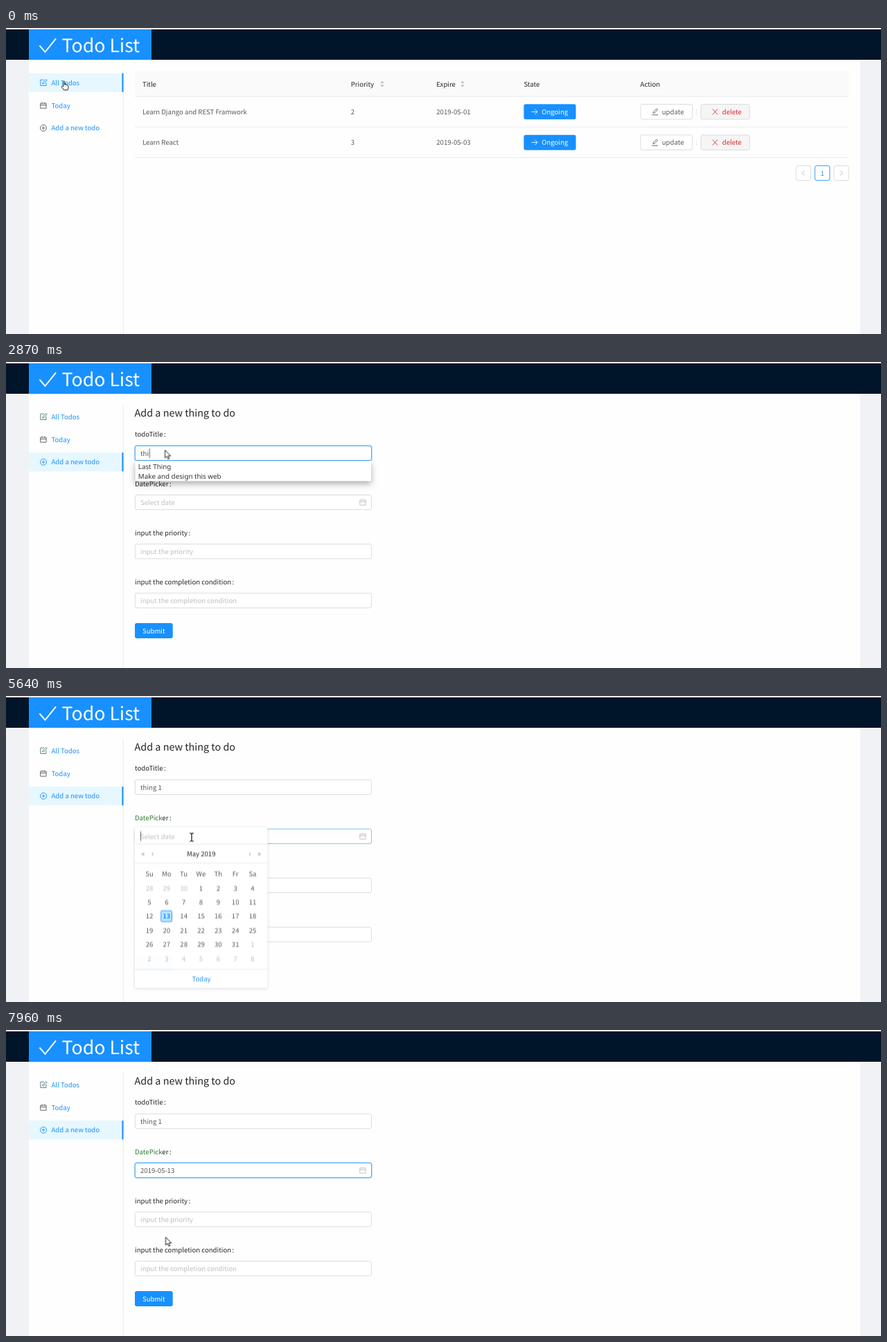
An HTML page for the animation above (8000 ms loop, 1263 by 443 pixels).

```html
<!DOCTYPE html>
<html lang="en">
<head>
<meta charset="utf-8">
<title>Todo List</title>
<style>
html, body { margin: 0; width: 100%; height: 100%; overflow: hidden; background: #f0f2f5; }
svg { display: block; width: 1263px; height: 443px; }
text { font: 9.6px "Noto Sans CJK SC", "Noto Sans CJK JP", "Noto Sans CJK", sans-serif; fill: #595959; text-rendering: geometricPrecision; white-space: pre; }
.link { fill: #1890ff; }
.dark { fill: #262626; }
.strong { font-weight: 500; fill: #262626; }
.ph { fill: #bfbfbf; }
.white { fill: #fff; }
.red { fill: #e0282a; }
.mid { text-anchor: middle; }
.brand { font-size: 26.7px; font-weight: 300; fill: #fff; }
.h2 { font-size: 14.36px; font-weight: 500; fill: #262626; }
.arrow { font-size: 11px; fill: #8c8c8c; }
.menu text { font-family: "Noto Sans", "Open Sans", sans-serif; font-size: 9.8px; fill: #333; }
.icon { fill: none; stroke: currentColor; stroke-width: .9; color: #595959; }
.box { fill: #fff; stroke: #d9d9d9; stroke-width: .9; }
.blue { fill: #1890ff; }
.rule { stroke: #e8e8e8; stroke-width: .9; }
.caret { stroke: #444; stroke-width: .8; }
.ring rect { fill: none; stroke: #40a9ff; }
.ring .glow { stroke: #1890ff; stroke-opacity: .2; stroke-width: 1.5; }

/* 1% of the loop is 80 ms */
.hold { animation: 8s step-end infinite; }
.flow { animation: 8s linear infinite; }

.list { animation-name: list; }
.form { animation-name: form; }
@keyframes list { 0% { visibility: visible } 13.5%, 100% { visibility: hidden } }
@keyframes form { 0% { visibility: hidden } 13.5%, 100% { visibility: visible } }

.bg-all { animation-name: bgAll; }
.bg-add { animation-name: bgAdd; }
.bar-all { animation-name: barAll; }
.bar-add { animation-name: barAdd; }
.ic-all { animation-name: icAll; }
.ic-today { animation-name: icToday; }
.ic-add { animation-name: icAdd; }
@keyframes bgAll { 0%, 13.7% { opacity: 1 } 17.3%, 100% { opacity: 0 } }
@keyframes bgAdd { 0%, 12.4% { opacity: 0 } 13.5% { opacity: .5 } 15.6%, 100% { opacity: 1 } }
@keyframes barAll { 0%, 13.7% { opacity: 1 } 15.6%, 100% { opacity: 0 } }
@keyframes barAdd { 0%, 13.7% { opacity: 0 } 15.6%, 100% { opacity: 1 } }
@keyframes icAll { 0%, 13.7% { color: #1890ff } 17.3%, 100% { color: #4d7479 } }
@keyframes icToday { 0%, 3% { color: #595959 } 5%, 6.5% { color: #1890ff } 9%, 100% { color: #595959 } }
@keyframes icAdd { 0%, 7.5% { color: #595959 } 10.6%, 100% { color: #1890ff } }

.focus-title { animation-name: focusTitle; }
.hover-date { animation-name: hoverDate; }
.focus-date { animation-name: focusDate; }
@keyframes focusTitle { 0%, 22.4% { opacity: 0 } 27.4%, 67% { opacity: 1 } 70%, 100% { opacity: 0 } }
@keyframes hoverDate { 0%, 62% { opacity: 0 } 66%, 70.5% { opacity: .5 } 74%, 100% { opacity: 0 } }
@keyframes focusDate { 0%, 93.7% { opacity: 0 } 97.5%, 100% { opacity: 1 } }

.type { animation-name: type; }
.ph-title { animation-name: phTitle; }
.caret-title { animation-name: caretTitle; }
@keyframes type {
  0% { transform: none }
  31.875% { transform: translateX(3.6px) }
  33.875% { transform: translateX(9.5px) }
  35.875% { transform: translateX(12.1px) }
  39.75% { transform: translateX(18px) }
  42.625% { transform: translateX(23.4px) }
  45.5% { transform: translateX(25.6px) }
  48.375%, 100% { transform: translateX(30.9px) }
}
@keyframes phTitle { 0% { visibility: inherit } 31.875%, 100% { visibility: hidden } }
@keyframes caretTitle { 0% { opacity: 0 } 23.4% { opacity: 1 } 67.75%, 100% { opacity: 0 } }

.menu { animation-name: menu; filter: drop-shadow(0 4px 5px rgba(0,0,0,.32)); }
.menu-box { animation-name: menuBox; }
.all-hits { animation-name: allHits; }
.hits { animation-name: hits; }
.hit-two { animation-name: hitTwo; }
@keyframes menu { 0%, 31.86% { opacity: 0 } 31.875%, 48.375% { opacity: 1 } 50.25%, 100% { opacity: 0 } }
@keyframes menuBox { 0% { height: 56.5px } 33.875% { height: 29px } 39.75%, 100% { height: 15.5px } }
@keyframes allHits { 0% { opacity: 1 } 33.875%, 100% { opacity: 0 } }
@keyframes hits { 0% { opacity: 0 } 33.875%, 100% { opacity: 1 } }
@keyframes hitTwo { 0% { opacity: 1 } 39.75%, 100% { opacity: 0 } }

.tint { animation-name: tint; }
@keyframes tint { 0% { fill: #262626 } 48.375%, 100% { fill: #2e7d32 } }

.picker { transform-origin: 186px 190px; filter: drop-shadow(0 1.4px 2.7px rgba(0,0,0,.15)); animation-name: picker; }
.caret-date { animation-name: caretDate; }
.empty { animation-name: empty; }
.filled { animation-name: filled; }
@keyframes picker {
  0% { opacity: 0; transform: scaleY(.8) }
  69% { opacity: 0; transform: scaleY(.8); animation-timing-function: cubic-bezier(.23,1,.32,1) }
  71.5% { opacity: 1; transform: none }
  93.75% { opacity: 1; transform: none; animation-timing-function: cubic-bezier(.755,.05,.855,.06) }
  96.25%, 100% { opacity: 0; transform: scaleY(.8) }
}
@keyframes caretDate { 0% { opacity: 1 } 81% { opacity: 0 } 88.5% { opacity: 1 } 93.75%, 100% { opacity: 0 } }
@keyframes empty { 0% { opacity: 1 } 93.75%, 100% { opacity: 0 } }
@keyframes filled { 0% { opacity: 0 } 93.75%, 100% { opacity: 1 } }

.pointer { animation-name: pointer; }
.hand { animation-name: hand; }
.tip { animation-name: tip; }
.beam { animation-name: beam; }
@keyframes pointer {
  0%, .5% { transform: translate(84px, 78px); animation-timing-function: ease-in-out }
  10.6%, 15% { transform: translate(85px, 145px) }
  22.4% { transform: translate(218px, 132px); animation-timing-function: ease-out }
  27.4%, 58.4% { transform: translate(229.5px, 127.5px) }
  62.75% { transform: translate(253.5px, 208px) }
  63.75% { transform: translate(262px, 213px) }
  64.75%, 71.5% { transform: translate(268px, 204.5px) }
  79.5% { transform: translate(286px, 320px) }
  86% { transform: translate(252.5px, 331px) }
  89.9%, 95.75% { transform: translate(232px, 318px); animation-timing-function: ease-out }
  99.5%, 100% { transform: translate(230.5px, 300px) }
}
@keyframes hand { 0% { opacity: 1 } 19.9% { opacity: 0 } 75.7% { opacity: 1 } 95.75%, 100% { opacity: 0 } }
@keyframes tip {
  0% { opacity: 0 } 19.9% { opacity: 1 } 20.8% { opacity: 0 }
  31.875% { opacity: 1 } 48.375% { opacity: 0 } 59.5% { opacity: 1 } 62% { opacity: 0 }
  72.2% { opacity: 1 } 75.7% { opacity: 0 } 95.75%, 100% { opacity: 1 }
}
@keyframes beam {
  0% { opacity: 0 } 20.8% { opacity: 1 } 31.875% { opacity: 0 } 48.375% { opacity: 1 }
  59.5% { opacity: 0 } 62% { opacity: 1 } 72.2%, 100% { opacity: 0 }
}
</style>
</head>
<body>
<svg viewBox="0 0 1263 443">
  <defs>
    <g id="calendar"><path d="M.5 2h8.4v7.2H.5zM.5 4.5h8.4M2.9.6v2.2M6.5.6v2.2"/></g>
    <g id="sorter" fill="#bfbfbf"><path d="M-2.8-1.2L0-4.6 2.8-1.2zM-2.8 1.2L0 4.6 2.8 1.2z"/></g>
    <g id="actions">
      <rect class="blue" x="747.4" y="-11" width="75.2" height="22" rx="2.7"/>
      <path d="M758.5 0h8.6m-3.7-3.8L767.1 0l-3.7 3.8" fill="none" stroke="#fff" stroke-width=".9"/>
      <text class="white" x="773.3" y="3.5">Ongoing</text>
      <rect class="box" x="915.9" y="-10.8" width="74.8" height="21.6" rx="2.7"/>
      <path class="icon" d="M932.3 4.5h9M934 2l.4-1.9 4.7-4.6 1.6 1.6-4.7 4.5z"/>
      <text x="946.8" y="3.5">update</text>
      <path class="rule" d="M996.6-4.5v9"/>
      <rect class="box" x="1003" y="-10.8" width="70.4" height="21.6" rx="2.7" style="fill:#f5f5f5"/>
      <path d="M1020-4l7 8m0-8l-7 8" stroke="#e0282a" stroke-width=".9"/>
      <text class="red" x="1033.8" y="3.5">delete</text>
    </g>
  </defs>

  <rect width="1263" height="2" fill="#eceff1"/>
  <rect y="2" width="1263" height="44" fill="#001529"/>
  <rect x="33" y="46" width="1200" height="397" fill="#fefefe"/>
  <rect class="blue" x="33" y="2" width="177" height="44"/>
  <path d="M48.5 25.5l8 9.3L72 15.3" fill="none" stroke="#fff" stroke-width="2"/>
  <text class="brand" x="80.5" y="35.3">Todo List</text>

  <path class="rule" d="M169.4 62V443"/>
  <g fill="#e6f7ff">
    <rect class="flow bg-all" x="33" y="65.5" width="136.5" height="27.2"/>
    <rect class="flow bg-add" x="33" y="131.2" width="136.5" height="27.2"/>
  </g>
  <rect class="blue flow bar-all" x="167.4" y="65.5" width="2.1" height="27.2"/>
  <rect class="blue flow bar-add" x="167.4" y="131.2" width="2.1" height="27.2"/>
  <path class="icon flow ic-all" d="M55 75.1h-5.2v8.3h8.2v-4.4M52.7 81l.3-1.8 4.9-4.8 1.4 1.4-4.9 4.9z"/>
  <use class="icon flow ic-today" href="#calendar" x="49.2" y="107"/>
  <g class="icon flow ic-add"><circle cx="54" cy="144.8" r="4.5"/><path d="M51.7 144.8h4.6M54 142.5v4.6"/></g>
  <text class="link" x="65.5" y="82.6">All Todos</text>
  <text class="link" x="65.5" y="115.5">Today</text>
  <text class="link" x="65.5" y="148.3">Add a new todo</text>

  <g class="hold list">
    <rect x="186" y="62.5" width="1030.5" height="36.5" fill="#fafafa"/>
    <path class="rule" d="M186 99H1216.5M186 143.3H1216.5M186 187.7H1216.5"/>
    <text class="strong" x="196.9" y="84.6">Title</text>
    <text class="strong" x="497.8" y="84.6">Priority</text>
    <text class="strong" x="621.3" y="84.6">Expire</text>
    <text class="strong" x="747.4" y="84.6">State</text>
    <text class="strong" x="915.6" y="84.6">Action</text>
    <use href="#sorter" x="543" y="81"/>
    <use href="#sorter" x="659" y="81"/>
    <text x="196.9" y="125">Learn Django and REST Framwork</text>
    <text x="497.8" y="125">2</text>
    <text x="621.3" y="125">2019-05-01</text>
    <use href="#actions" y="121.3"/>
    <text x="196.9" y="169.4">Learn React</text>
    <text x="497.8" y="169.4">3</text>
    <text x="621.3" y="169.4">2019-05-03</text>
    <use href="#actions" y="165.7"/>
    <rect class="box" x="1140.4" y="199.4" width="21.3" height="21.3" rx="2.7"/>
    <rect class="box" x="1167.7" y="199.4" width="21.3" height="21.3" rx="2.7" style="stroke:#1890ff"/>
    <rect class="box" x="1195" y="199.4" width="21.3" height="21.3" rx="2.7"/>
    <path d="M1153 206.8l-4 3.4 4 3.4M1203.7 206.8l4 3.4-4 3.4" fill="none" stroke="#bfbfbf" stroke-width=".9"/>
    <text class="strong link mid" x="1178.3" y="213.7" style="fill:#1890ff">1</text>
  </g>

  <g class="hold form">
    <text class="h2" x="185.6" y="79.2">Add a new thing to do</text>
    <text class="dark" x="186" y="108.4">todoTitle<tspan dx="1.4">:</tspan></text>
    <text class="dark" x="186" y="179.5"><tspan class="hold tint">DatePick</tspan>er<tspan dx="1.4">:</tspan></text>
    <text class="dark" x="186" y="250.6">input the priority<tspan dx="1.4">:</tspan></text>
    <text class="dark" x="186" y="321.7">input the completion condition<tspan dx="1.4">:</tspan></text>
    <g id="fields"></g>

    <text x="194" y="135.8">thing 1</text>
    <rect class="hold type" x="194.3" y="124" width="40" height="16" fill="#fff"/>
    <text class="ph hold ph-title" x="194" y="135.8">input things to do</text>
    <g class="hold type"><path class="caret hold caret-title" d="M195.2 125.2v13.6"/></g>
    <g class="ring flow focus-title">
      <rect class="glow" x="185.2" y="120.4" width="343.4" height="23.2" rx="3.4"/>
      <rect x="186.3" y="121.4" width="341.2" height="21.2" rx="2.7"/>
    </g>

    <text class="ph hold empty" x="194" y="206.9">Select date</text>
    <text class="hold filled" x="194" y="206.9">2019-05-13</text>
    <use class="icon" href="#calendar" x="510.3" y="198" style="color:#bfbfbf"/>
    <g class="ring"><rect class="flow hover-date" x="186.3" y="192.5" width="341.2" height="21.2" rx="2.7"/></g>
    <g class="ring flow focus-date">
      <rect class="glow" x="185.2" y="191.5" width="343.4" height="23.2" rx="3.4"/>
      <rect x="186.3" y="192.5" width="341.2" height="21.2" rx="2.7"/>
    </g>

    <text class="ph" x="194" y="278">input the priority</text>
    <text class="ph" x="194" y="349.1">input the completion condition</text>
    <rect class="blue" x="186" y="378" width="54.7" height="22" rx="2.7"/>
    <text class="white mid" x="213.3" y="392.6">Submit</text>

    <g class="menu flow">
      <rect class="hold menu-box" x="186.6" y="143.4" width="340.4" height="29" fill="#fff"/>
      <g class="hold all-hits">
        <text x="190.8" y="155.1">Learn Django and REST Framwork</text>
        <text x="190.8" y="168.7">Learn React</text>
        <text x="190.8" y="182.3">Last Thing</text>
        <text x="190.8" y="195.9">Make and design this web</text>
      </g>
      <g class="hold hits">
        <text x="190.8" y="155.1">Last Thing</text>
        <text class="hold hit-two" x="190.8" y="168.7">Make and design this web</text>
      </g>
    </g>

    <g class="picker flow">
      <rect x="186" y="190" width="191.5" height="233.5" rx="2.7" fill="#fff"/>
      <path class="rule" d="M186 214.5H377.5M186 241.9H377.5M186 396.2H377.5"/>
      <text class="ph hold empty" x="194" y="206.6">Select date</text>
      <text class="hold filled" x="194" y="206.6">2019-05-13</text>
      <path class="caret hold caret-date" d="M194.5 195.8v14"/>
      <text class="strong mid" x="281.7" y="232.2">May 2019</text>
      <text class="arrow mid" x="198" y="232">«</text>
      <text class="arrow mid" x="211.7" y="232">‹</text>
      <text class="arrow mid" x="351.8" y="232">›</text>
      <text class="arrow mid" x="365.4" y="232">»</text>
      <rect x="223.8" y="311.2" width="15.6" height="15.8" rx="1.4" fill="#bae7ff" stroke="#1890ff" stroke-width=".9"/>
      <g id="days"></g>
      <text class="link mid" x="282" y="413.5">Today</text>
    </g>
  </g>

  <g class="pointer flow">
    <g class="hand hold" stroke="#111" stroke-width=".9" stroke-linejoin="round">
      <path d="M-1.6 7V.6Q-1.6-.6-.5-.6T.6.6V4.2Q1.8 3.4 2.5 4.4 3.7 3.8 4.3 4.9 5.9 4.6 5.9 6.2V8.6Q5.8 10 4.9 11.6H-.8Q-2-.1-3.6 6.6-2.8 5.6-1.6 7z" fill="none" stroke="none"/>
      <path d="M-1.2 6.6V.7Q-1.2-.4-.2-.4T.8.7V4.3Q2-.1 2.4 4.5 3.6 3.8 4.2 4.9 5.9 4.7 5.9 6.4V8.6Q5.8 10.2 5 11.8H-.6Q-1.4 9.9-3.6 7.6-3.9 6.1-2.5 6.2-1.9 6.3-1.2 7z" fill="#fff"/>
    </g>
    <path class="tip hold" d="M0 0V11.4L2.7 9 4.5 13 6.4 12.1 4.7 8.3H8.1z" fill="#fff" stroke="#111" stroke-width=".95"/>
    <path class="beam hold" d="M-2.8-5.8Q-.4-5.8 0-4.8 .4-5.8 2.8-5.8M0-4.8V4.8M-2.8 5.8Q-.4 5.8 0 4.8 .4 5.8 2.8 5.8" fill="none" stroke="#222" stroke-width="1.3"/>
  </g>
</svg>
<script>
const NS = "http://www.w3.org/2000/svg";
function add(parent, tag, attrs, content = "") {
  const el = document.createElementNS(NS, tag);
  for (const key in attrs) el.setAttribute(key, attrs[key]);
  el.textContent = content;
  document.getElementById(parent).append(el);
}

for (let i = 0; i < 4; i++) {
  add("fields", "rect", { class: "box", x: 186.3, y: 121.4 + i * 71.1, width: 341.2, height: 21.2, rx: 2.7 });
}

const column = i => 207 + (i % 7) * 24.83;
["Su", "Mo", "Tu", "We", "Th", "Fr", "Sa"].forEach((name, i) =>
  add("days", "text", { class: "mid", x: column(i), y: 261 }, name));

for (let i = 0; i < 42; i++) {
  const day = new Date(2019, 3, 28 + i);
  const inMonth = day.getMonth() === 4;
  const today = inMonth && day.getDate() === 13;
  add("days", "text", {
    class: inMonth ? "mid" : "mid ph",
    style: today ? "fill:#1890ff;font-weight:700" : "",
    x: column(i),
    y: 281.8 + Math.floor(i / 7) * 20.5
  }, day.getDate());
}
</script>
</body>
</html>
```
